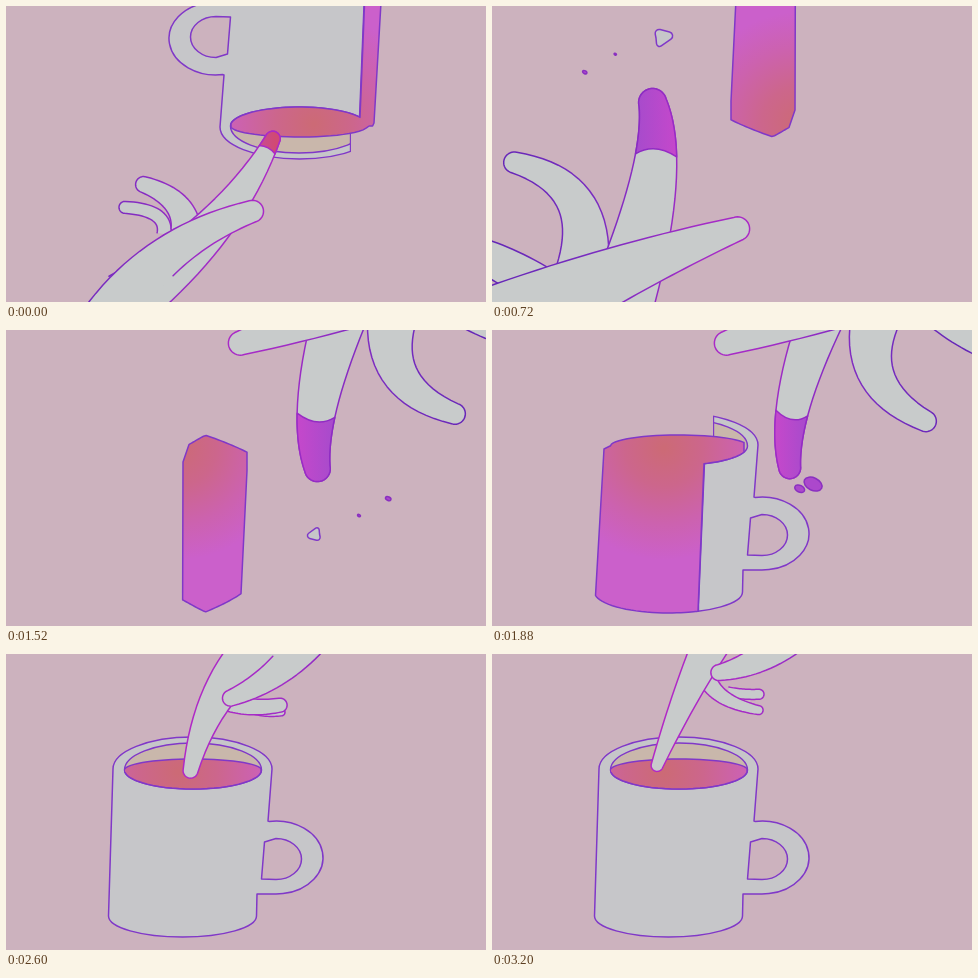
An HTML page with a canvas for the animation above (3290 ms loop, 480x296 px).

```html
<!DOCTYPE html>
<html lang="en">
<head>
<meta charset="utf-8">
<title>Mug and hand</title>
<style>
html, body { margin: 0; width: 100%; height: 100%; overflow: hidden; background: #ccb2be; }
canvas { display: block; width: 480px; height: 296px; }
</style>
</head>
<body>
<canvas id="stage" width="480" height="296"></canvas>
<script>
const ctx = document.getElementById('stage').getContext('2d');
const { PI, max, min, abs, sqrt, cos, sin, hypot } = Math;
const LOOP = 3290, TURN = 950, FULL = 2240;
const BG = '#ccb2be', SKIN = '#c8cbcb', MUG = '#c6c6c9', INSIDE = '#c9b7ab', MUG_LINE = '#8038c8';

// Hold lengths of the drawings, in tens of milliseconds.
const HOLDS = '9999999949444449494949449999999999944449994499';

// All art lives in the upright view; the first half is seen turned by 180 degrees.
const turned = pose => pose.map(limb => limb.map((v, i) => i > 5 ? v : (i % 2 ? 236 : 480) - v));
const moved = (pose, dx, dy) => pose.map(limb => limb.map((v, i) => i > 5 ? v : v + (i % 2 ? dy : dx)));

// A limb is base, bend, tip, then half widths at base and tip.
// A pose is index finger, thumb, middle finger, last finger.
const dipOut = turned([
  [120, 295, 222, 225, 270, 126, 30, 7.5],
  [100, 318, 150, 236, 257, 202, 27, 11],
  [180, 222, 178, 192, 130, 176, 15, 8],
  [158, 228, 162, 204, 113, 201, 7, 6]
]);
const spread = turned([
  [128, 300, 177, 158, 157, 83, 33, 14],
  [-20, 335, 112, 268, 257, 219, 46, 12],
  [90, 265, 108, 178, 12, 154, 26, 10.5],
  [75, 300, 20, 258, -40, 240, 22, 16]
]);
const dipIn = [
  [290, -30, 207, 10, 183, 124, 30, 7.5],
  [310, -25, 277, 24, 217, 47, 20, 8],
  [222, 48, 245, 56, 281, 50, 9, 7],
  [240, 52, 255, 60, 279, 58, 5, 3.5]
];
const stir = [
  [235, -40, 196, 30, 163, 117, 22, 6],
  [310, -30, 275, 10, 219, 20, 20, 8],
  [216, 26, 226, 48, 271, 57, 9, 4.5],
  [236, 38, 252, 41, 272, 40, 5, 5]
];

// Turn the fingers about their bases, the thumb staying put.
function swing(pose, degrees, slim) {
  return pose.map((limb, i) => {
    const turn = degrees * [1, 0, 1.9, 1.9][i] * PI / 180, c = cos(turn), s = sin(turn);
    const [bx, by, cx, cy, tx, ty, w0, w1] = limb;
    const spin = (x, y) => [bx + (x - bx) * c - (y - by) * s, by + (x - bx) * s + (y - by) * c];
    const k = i ? 1 : slim;
    return [bx, by, ...spin(cx, cy), ...spin(tx, ty), w0 * k, w1 * k];
  });
}

const handKeys = [
  [0, dipOut], [360, swing(spread, 4, .9)], [720, spread], [1180, spread],
  [1880, swing(spread, 6.3, .78)], [FULL, moved(dipIn, 20, -2)], [2600, dipIn], [3200, stir]
];

// Liquid wall: left, right, end of the lip, shoulder drop, shortening.
const thin = [112, 126, 255, 0, 0], whole = [112, 249, 249, 0, 0], shard = [177, 241, 241, 13, 0];
const wallKeys = [
  [0, thin], [360, whole], [720, shard], [1180, [235, 243, 243, 6, 18]],
  [1440, shard], [1700, whole], [1880, [112, 212, 252, 0, 0]], [2150, thin]
];
// Where the grey wall starts, and the size of the last chip of the handle.
const cutKeys = [[0, [126]], [360, [249]], [600, [290]], [1500, [290]], [1700, [249]], [1880, [212]], [2150, [126]], [FULL, [80]]];
const chipKeys = [[600, [1.6]], [720, [1]], [850, [0]], [1390, [0]], [1500, [1.6]]];

// Drops: start, speed per ms, size.
const drops = [[308, 151, .139, .033, 11], [298, 153, .103, .061, 6]];

const mix = (a, b, k) => Array.isArray(a) ? a.map((v, i) => mix(v, b[i], k)) : a + (b - a) * k;

function tween(keys, t) {
  const i = max(0, keys.filter(key => key[0] <= t).length - 1);
  const [t0, a] = keys[i], [t1, b] = keys[i + 1] || [Infinity, a];
  return mix(a, b, max(0, (t - t0) / (t1 - t0)));
}

function blend(gradient, ...colors) {
  colors.forEach((c, i) => gradient.addColorStop(i / (colors.length - 1), c));
  return gradient;
}

function trace(points) {
  const path = new Path2D();
  points.forEach(p => path.lineTo(...p));
  return path;
}

function paint(path, fill, line, rule = 'nonzero') {
  ctx.fillStyle = fill;
  ctx.fill(path, rule);
  ctx.strokeStyle = line;
  ctx.stroke(path);
}

const liquidFill = blend(ctx.createRadialGradient(172, 118, 2, 172, 118, 112), '#cc6a76', '#cc668c', '#cc62ae', '#cb60cb');
const handLine = blend(ctx.createLinearGradient(170, 0, 480, 0), '#b228c6', '#a22cc6', '#7a2cc0', '#6426b6');

// Heights of the mug's curves above a given x.
const dome = (x, cx, rx, ry) => ry * sqrt(max(0, 1 - ((x - cx) / rx) ** 2));
const back = x => 116 - dome(x, 187, 68.5, 11);
const front = x => 116 + dome(x, 187, 68.5, 19);
const bottom = x => 262 + dome(x, 176.5, 74, 21);

// Points of a curve from a to b, closer together at the ends.
const along = (a, b, y, n = 30) => Array.from({ length: n + 1 }, (_, i) => {
  const x = a + (b - a) * (1 - cos(PI * i / n)) / 2;
  return [x, y(x)];
});

const mugPath = new Path2D();
mugPath.ellipse(186.5, 115, 79.5, 32, 0, PI, 2 * PI);
mugPath.lineTo(262, 167);
mugPath.ellipse(270, 203.5, 47, 36.5, 0, -PI / 2 - .15, PI / 2);
mugPath.lineTo(251, 240);
mugPath.ellipse(176.5, 262, 74, 21, 0, 0, PI);
mugPath.closePath();
mugPath.moveTo(255.5, 225);
mugPath.lineTo(258.5, 188);
mugPath.ellipse(270, 205, 25.5, 20.5, 0, -PI / 2, PI / 2);
mugPath.closePath();

const openingPath = new Path2D();
openingPath.ellipse(187, 116, 68.5, 27, 0, PI, 2 * PI);
openingPath.ellipse(187, 116, 68.5, 19, 0, 0, PI);

function drawWall(t) {
  const c = tween(cutKeys, t)[0];
  const cut = trace([[c + 9, 70], [c + 9, 110], [c, front(c)], [c - 6, 275], [c - 6, 290], [345, 290], [345, 70]]);
  cut.closePath();
  ctx.save();
  ctx.clip(cut);
  paint(mugPath, MUG, MUG_LINE, 'evenodd');
  paint(openingPath, INSIDE, MUG_LINE);
  ctx.clip(mugPath, 'evenodd');
  ctx.lineWidth = 2.4;
  ctx.stroke(cut);
  ctx.restore();
}

function drawChip(t) {
  const k = tween(chipKeys, t)[0];
  if (k < .02) return;
  const path = new Path2D();
  const at = (x, y) => [307 + x * k, 204 + y * k];
  path.moveTo(...at(9, 0));
  path.arcTo(...at(11, 10), ...at(-13, 4), 4 * k);
  path.arcTo(...at(-13, 4), ...at(8, -11), 4 * k);
  path.arcTo(...at(8, -11), ...at(9, 0), 3 * k);
  path.closePath();
  paint(path, MUG, MUG_LINE);
}

function liquidPath(t) {
  if (t >= FULL) return trace([...along(119, 255, back), ...along(255, 119, front)]);
  const [l, r, lip, drop, cut] = tween(wallKeys, t);
  const lean = 1 - cut / 18, sink = .8 * cut;
  const shoulder = x => {
    const u = (x - l) / (r - l) - .35;
    return drop * min(1, abs(u) / (u < 0 ? .35 : .65));
  };
  const corner = min(6, (r - l) * .1);
  const path = trace([
    [l, 119 + drop + sink],
    ...along(l + corner, lip, x => back(x) + shoulder(x) + sink),
    ...along(lip, r, x => front(x) + drop + sink),
    ...along(r - 6 * lean, l - max(0, 180 - l) / 8 * lean, x => bottom(x) - cut - shoulder(x))
  ]);
  path.closePath();
  return path;
}

// Outline of a limb around its bent spine, each side starting at its own share.
function outline([bx, by, cx, cy, tx, ty, w0, w1], left = 0, right = 0) {
  const reach = hypot(tx - cx, ty - cy);
  const ex = tx - (tx - cx) / reach * w1, ey = ty - (ty - cy) / reach * w1;
  const edge = (t, angle) => {
    const s = 1 - t, w = w0 + (w1 - w0) * t;
    const dx = s * (cx - bx) + t * (ex - cx), dy = s * (cy - by) + t * (ey - cy);
    const side = cos(angle) * w / hypot(dx, dy), ahead = sin(angle) * w / hypot(dx, dy);
    return [
      s * s * bx + 2 * s * t * cx + t * t * ex + dy * side + dx * ahead,
      s * s * by + 2 * s * t * cy + t * t * ey - dx * side + dy * ahead
    ];
  };
  const steps = [...Array(21).keys()].map(i => i / 20);
  return [
    ...steps.map(u => edge(left + (1 - left) * u, 0)),
    ...steps.map(u => edge(1, PI * u)),
    ...steps.map(u => edge(1 - (1 - right) * u, PI))
  ];
}

function drawNail(index, t) {
  const start = tween([[0, [.94]], [360, [.65]]], t)[0];
  const points = outline(index, start, start), path = trace(points);
  const [x0, y0] = points[0], [x1, y1] = points[points.length - 1];
  // The lower edge bows slightly towards the fingertip.
  const cx = (x0 + x1) / 2, cy = (y0 + y1) / 2;
  path.quadraticCurveTo(cx + (index[4] - cx) * .2, cy + (index[5] - cy) * .2, x0, y0);
  const g = ctx.createLinearGradient(min(x0, x1), 0, max(x0, x1), 0);
  paint(path, t < 90 ? blend(g, '#d04a74', '#c84a94') : blend(g, '#c548cb', '#a64bcc'), handLine);
}

function drawHand(t) {
  const [index, thumb, middle, last] = tween(handKeys, t);
  for (const finger of [last, middle, index]) paint(trace(outline(finger)), SKIN, handLine);
  if (t < 2150) drawNail(index, t);
  // The thumb's inner line fades into the palm.
  ctx.fillStyle = SKIN;
  ctx.fill(trace(outline(thumb)));
  ctx.stroke(trace(outline(thumb, 0, .45)));
}

function drawDrops(t) {
  const age = t < TURN ? t - 150 : 1974 - t;
  if (age <= 0 || age > 690) return;
  for (const [x, y, vx, vy, size] of drops) {
    const r = size * (1 - age / 720), path = new Path2D();
    path.ellipse(x + vx * age, y + vy * age, r, r * .65, .45, 0, 2 * PI);
    paint(path, '#ac48cc', '#8a30c0');
  }
}

function heldTime(t) {
  let at = 0;
  for (const h of HOLDS) {
    if (at + h * 10 > t) break;
    at += h * 10;
  }
  return at;
}

function frame(now) {
  const t = heldTime(now % LOOP);
  ctx.setTransform(1, 0, 0, 1, 0, 0);
  ctx.fillStyle = BG;
  ctx.fillRect(0, 0, 480, 296);
  if (t < TURN) ctx.setTransform(-1, 0, 0, -1, 480, 236);
  ctx.lineWidth = 1.5;
  ctx.lineJoin = ctx.lineCap = 'round';
  if (t < 600 || t >= 1500) drawWall(t);
  else drawChip(t);
  paint(liquidPath(t), liquidFill, MUG_LINE);
  drawDrops(t);
  drawHand(t);
  requestAnimationFrame(frame);
}
requestAnimationFrame(frame);
</script>
</body>
</html>
```
